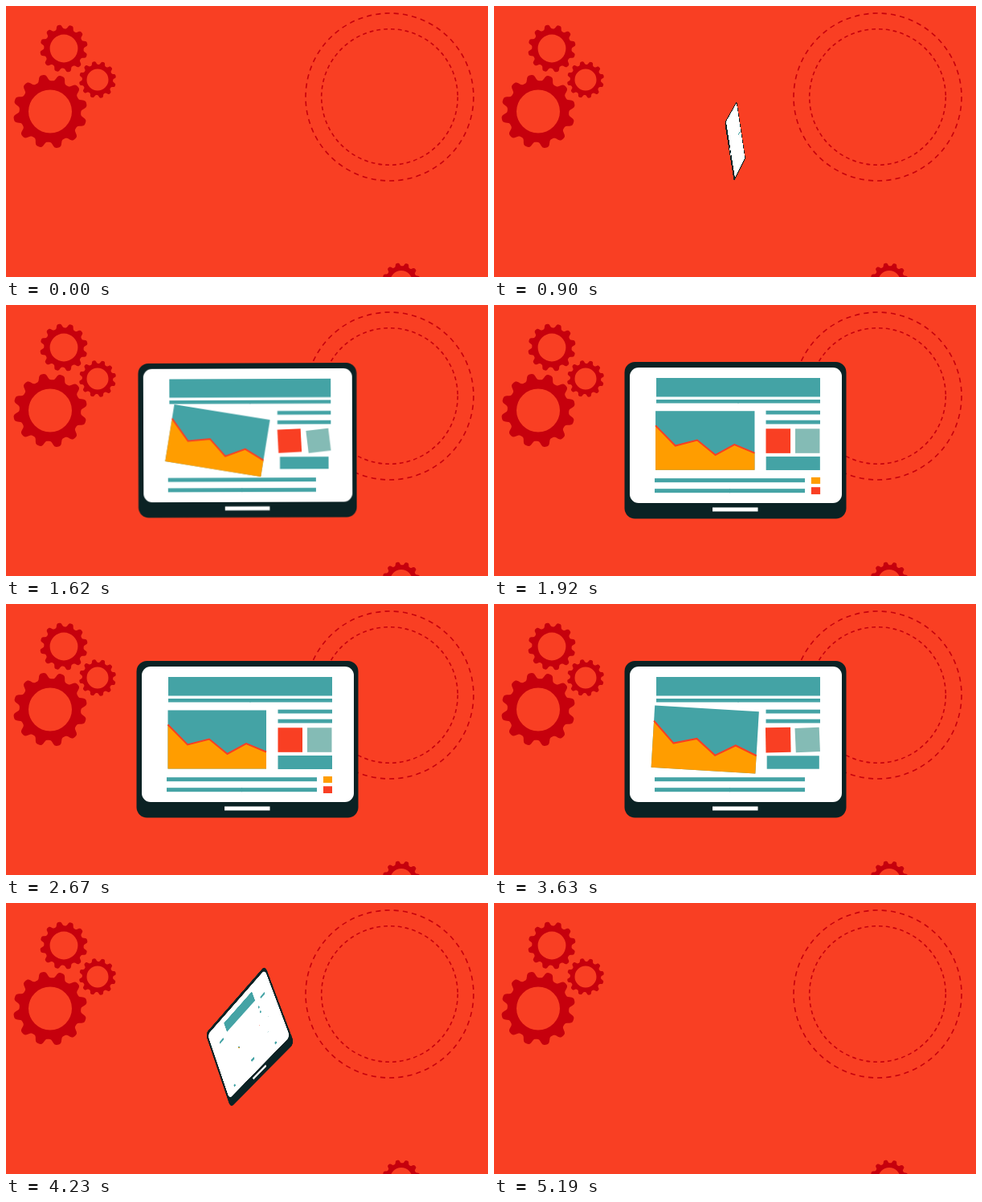
These frames come from a looping animation (600 by 338 pixels, 5370 ms). An HTML page:

```html
<!DOCTYPE html>
<html lang="en">
<head>
<meta charset="utf-8">
<title>Tablet and gears</title>
<style>
html, body { margin: 0; width: 100%; height: 100%; overflow: hidden; background: #f93f23; }
svg { position: absolute; left: 0; top: 0; display: block; }
.scene { position: absolute; left: 0; top: 0; width: 600px; height: 338px; overflow: hidden;
  perspective: 1430px; perspective-origin: 300.5px 168.5px; }

/* Everything runs forwards, then the same way back. */
.tablet, .tablet .a {
  animation: 2685ms linear infinite alternate both;
}
.tablet { transform-origin: 300.5px 168.5px; animation-name: zoom, spin; }
.a { transform-box: fill-box; transform-origin: center; }
.tablet .head { animation-name: head; }
.tablet .half { animation-name: half; }
.tablet .line { animation-name: line; }
.tablet .left { transform-origin: left; }
.tablet .right { transform-origin: right; }
.tablet .pop { animation-name: pop, turn; }
.tablet .dot { animation-name: dot; }

@keyframes zoom {
  0%, 6.7% { scale: 0 0 0; animation-timing-function: cubic-bezier(.58, 0, .63, 1); }
  64.8%, 100% { scale: 1 1 1; }
}
@keyframes spin {
  0%, 6.7% { transform: rotateY(-180deg) rotateZ(-104deg); animation-timing-function: cubic-bezier(.5, 0, .6, 1); }
  62%, 100% { transform: rotateY(0deg) rotateZ(0deg); }
}
@keyframes head {
  0%, 31.6% { scale: 0 1; animation-timing-function: cubic-bezier(.3, 0, .5, 1); }
  53%, 100% { scale: 1 1; }
}
@keyframes half {
  0%, 36% { scale: 0 1; animation-timing-function: ease-in-out; }
  58%, 100% { scale: 1 1; }
}
@keyframes line {
  0%, 38.4% { scale: 0 1; animation-timing-function: ease-in-out; }
  60.3%, 100% { scale: 1 1; }
}
@keyframes pop {
  0%, 38.4% { scale: 0; animation-timing-function: ease-in-out; }
  64.8% { scale: var(--over); animation-timing-function: ease-in-out; }
  73.7%, 100% { scale: 1; }
}
@keyframes turn {
  0%, 41.3% { rotate: var(--from); animation-timing-function: ease-in-out; }
  71.5%, 100% { rotate: 0deg; }
}
@keyframes dot {
  0%, 66% { scale: 0; animation-timing-function: cubic-bezier(.4, 0, .4, 1.3); }
  73.7%, 100% { scale: 1; }
}
</style>
</head>
<body>
<div class="scene">
  <svg width="600" height="338" viewBox="0 0 600 338">
    <defs><path id="gear" fill-rule="evenodd"/></defs>
    <g fill="#c6000d">
      <use href="#gear" transform="translate(55 131.5)"/>
      <use href="#gear" transform="translate(72 53) scale(.645)"/>
      <use href="#gear" transform="translate(114 92) scale(.5)"/>
      <use href="#gear" transform="translate(492 343.8) scale(.51)"/>
    </g>
    <g fill="none" stroke="#c6000d" stroke-width="1.6">
      <circle cx="477.5" cy="113.5" r="104.5" stroke-dasharray="6.2 5.1"/>
      <circle cx="477.5" cy="113.5" r="84.8" stroke-dasharray="4.8 4.1"/>
    </g>
  </svg>

  <svg class="tablet" width="600" height="338" viewBox="0 0 600 338">
    <rect x="162.5" y="71" width="276" height="195.5" rx="13" fill="#0b2224"/>
    <rect x="169" y="78" width="264" height="169" rx="11" fill="#fff"/>
    <rect x="272" y="252.5" width="56.5" height="5" fill="#fff"/>
    <g fill="#44a3a5">
      <rect class="a head" x="202" y="91" width="204" height="23.5"/>
      <rect class="a half left" x="202" y="118" width="102.5" height="4.5"/>
      <rect class="a half right" x="303.5" y="118" width="102.5" height="4.5"/>
      <rect class="a line" x="338.5" y="131.7" width="67.5" height="4.8"/>
      <rect class="a line" x="338.5" y="143.7" width="67.5" height="4.8"/>
      <rect class="a pop" x="338.5" y="189" width="67.5" height="17" style="--over: .965; --from: 0deg"/>
      <rect class="a line" x="200" y="216.2" width="187" height="5"/>
      <rect class="a line left" x="200" y="229.2" width="94" height="5"/>
      <rect class="a line right" x="293" y="229.2" width="94" height="5"/>
    </g>
    <g class="a pop" style="--over: 1.06; --from: 33deg">
      <rect x="201.5" y="132.5" width="122.5" height="73" fill="#44a3a5"/>
      <path d="M201.5 150.5 226 175.5 253 168.5 275.5 187 299 174 324 184.5V205.5H201.5Z" fill="#ff9d00"/>
      <path d="M201.5 150.5 226 175.5 253 168.5 275.5 187 299 174 324 184.5" fill="none" stroke="#f93f23" stroke-width="2"/>
    </g>
    <rect class="a pop" x="338.5" y="154.3" width="30.5" height="30.5" fill="#f93f23" style="--over: 1.02; --from: -10deg"/>
    <rect class="a pop" x="375" y="154.3" width="30.5" height="30.5" fill="#84bbb5" style="--over: .99; --from: -24deg"/>
    <rect class="a dot" x="395" y="215" width="11" height="8" fill="#ff9d00"/>
    <rect class="a dot" x="395" y="227.3" width="11" height="8.7" fill="#f93f23"/>
  </svg>
</div>
<script>
// Gear outline: a ring whose radius swings softly between root and tip.
const teeth = 12, phase = 18 * Math.PI / 180, steps = teeth * 18, points = [];
for (let i = 0; i < steps; i++) {
  const a = i / steps * 2 * Math.PI;
  const r = 42.2 + 4.2 * Math.tanh(1.8 * Math.cos(teeth * (a - phase)));
  points.push((r * Math.cos(a)).toFixed(2) + ' ' + (r * Math.sin(a)).toFixed(2));
}
document.getElementById('gear').setAttribute('d',
  'M' + points.join('L') + 'ZM27 0A27 27 0 1 0 -27 0A27 27 0 1 0 27 0Z');
</script>
</body>
</html>
```
